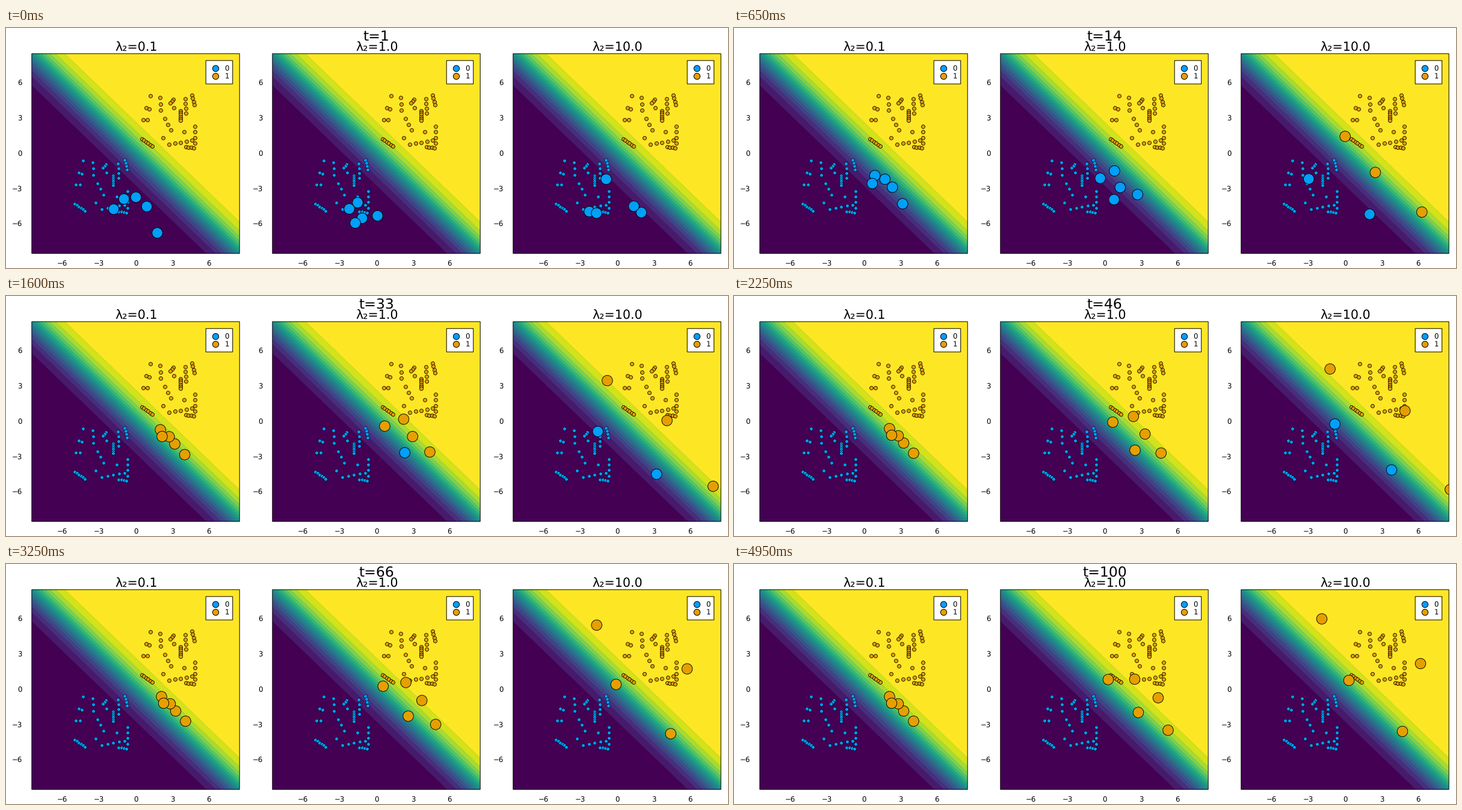
Write a matplotlib script that moves like this. It is 1200 px wide and 400 px high and loops after 5000 ms.

```python
import numpy as np
import matplotlib.pyplot as plt
from matplotlib.animation import FuncAnimation
from matplotlib.patches import Rectangle

plt.rcParams.update({"font.family": "DejaVu Sans", "text.hinting": "none"})

W, H, FRAMES, LOOP = 1200, 400, 100, 5000
PX = 0.72                      # points per pixel at 100 dpi
X0, Y0, PW, PH = 42.8, 42.8, 345.4, 333
CX, CY = 215.5, 209.4          # data origin inside a panel
SX, SY = 20.29, 19.59          # pixels per data unit
COLORS = np.array(["#009ffa", "#e69f00"])
VIRIDIS = plt.get_cmap("viridis")

# Class 1 samples lie on short runs: first point, last point, count
RUNS = [
    ((226, 185), (243, 197), 6), ((299, 198), (312, 200), 4),
    ((314, 164), (314, 192), 4), ((290, 138), (290, 154), 6),
    ((309, 112), (313, 128), 4), ((298, 118), (299, 142), 4),
    ((278, 119), (273, 125), 3), ((256, 116), (257, 137), 3),
    ((264, 151), (274, 170), 3), ((271, 194), (309, 187), 5),
    ((233, 133), (238, 135), 2), ((228, 153), (235, 153), 2),
    ((240, 113), (261, 183), 2), ((279, 133), (296, 173), 2)]
CLOUD = np.vstack([np.linspace(*run) for run in RUNS])

# Each search: start, where it settles, where it has drifted to in the end
LOW = [
    [(251.5, 341.5), (298.5, 262)], [(234, 297.5), (282, 245)],
    [(196, 285), (258.5, 221)], [(216, 282), (273, 233)],
    [(179, 302), (262, 232)]]
MID = [
    [(217.5, 313), (300, 249), (321.5, 277)],
    [(192, 317), (265, 236), (305, 223)],
    [(184.5, 291), (262, 208), (266, 192)],
    [(170.5, 301.5), (236, 225), (222, 192.5)],
    [(180.5, 325), (262, 265), (272, 247.5)]]
HIGH = [
    [(256, 307.5), (319, 297), (414, 331)],
    [(169.5, 306), (128, 272), (222, 194)],
    [(181.5, 308.5), (238, 323), (311, 279)],
    [(197.5, 252), (232, 213), (177, 91.5)],
    [(243.5, 297), (237, 268), (341, 166)]]


class Search:
    """Quick approach to a settling point plus a slow drift away from it."""

    def __init__(self, keys, settle, power):
        keys = np.array(keys, float)
        self.start, self.rest, self.end = keys[:, 0], keys[:, 1], keys[:, -1]
        self.settle, self.power = settle, power

    def at(self, i):
        left = max(0, 1 - i / self.settle) ** 2.7
        drift = 1 - (1 - i / (FRAMES - 1)) ** self.power
        return (self.rest + (self.end - self.rest) * drift
                + (self.start - self.rest) * left)


fig = plt.figure(figsize=(W / 100, H / 100), dpi=100, facecolor="white")
ax = fig.add_axes([0, 0, 1, 1])
ax.set(xlim=(0, W), ylim=(H, 0))
ax.axis("off")


def label(x, y, s, size, ha="center"):
    return ax.text(x, y, s, fontsize=size * PX, ha=ha, va="baseline", zorder=6)


def box(x, y, w, h, z, fill="none"):
    ax.add_patch(Rectangle((x, y), w, h, fc=fill, ec="black", lw=PX,
                           snap=False, zorder=z))


def dots(xy, diameter, color, z, width=0.6):
    xy = np.atleast_2d(xy)
    return ax.scatter(xy[:, 0], xy[:, 1], s=(diameter * PX) ** 2, c=color,
                      edgecolors="black", linewidths=width * PX, zorder=z,
                      snap=False)


def draw_bands(dx, clip):
    for i in range(1, 16):
        level = np.log(i / (16 - i))
        x = np.array([-10, 10, 10, -10])
        y = np.array([level + 10, level - 10, 25, 25])
        band, = ax.fill(dx + CX + SX * x, CY - SY * y, fc=VIRIDIS(i / 15),
                        ec=(0, 0, 0, 0.09), lw=0.5, zorder=1)
        band.set_clip_path(clip)


def draw_legend(dx):
    box(dx + 332.2, 54.2, 44.5, 39, 5, "white")
    for i, y in enumerate((67.2, 80.2)):
        dots((dx + 347.7, y), 10.3, COLORS[i], 6, 1)
        label(dx + 367, y + 4.3, str(i), 11.75)


def draw_panel(dx, title):
    clip = Rectangle((dx + X0, Y0), PW, PH, lw=0, zorder=0, fc=VIRIDIS(0.0))
    ax.add_patch(clip)
    draw_bands(dx, clip)
    box(dx + X0, Y0, PW, PH, 2)
    dots(CLOUD + (dx - 5.5 * SX, 5.5 * SY), 5.6, COLORS[0], 3)
    dots(CLOUD + (dx, 0), 6.0, COLORS[1], 3, 0.8)
    for v in (-6, -3, 0, 3, 6):
        s = str(v).replace("-", "\u2212")
        label(dx + CX + SX * v, 396.8, s, 11.75)
        label(dx + 26.6, CY - SY * v + 4.3, s, 11.75, "right")
    label(dx + 216.2, 38.5, title, 20.6)
    draw_legend(dx)
    big = dots(np.full((5, 2), 100.0) + (dx, 0), 17.5, COLORS[0], 4, 0.9)
    big.set_clip_path(clip)
    return big


PANELS = [(dx, draw_panel(dx, f"λ₂={strength}"), search)
          for dx, strength, search in (
              (0, 0.1, Search(LOW, 44, 1)),
              (400, 1.0, Search(MID, 44, 1)),
              (800, 10.0, Search(HIGH, 18, 2.3)))]
clock = label(615.8, 20.6, "", 23.5)


def update(i):
    clock.set_text(f"t={i + 1}")
    for dx, big, search in PANELS:
        p = search.at(i)
        score = (p[:, 0] - CX) / SX + (CY - p[:, 1]) / SY
        big.set_offsets(p + (dx, 0))
        big.set_facecolor(COLORS[(score > 0).astype(int)])
    return [clock] + [big for _, big, _ in PANELS]


anim = FuncAnimation(fig, update, frames=FRAMES, interval=LOOP / FRAMES,
                     repeat=True, repeat_delay=0, blit=False)
plt.show()
```
